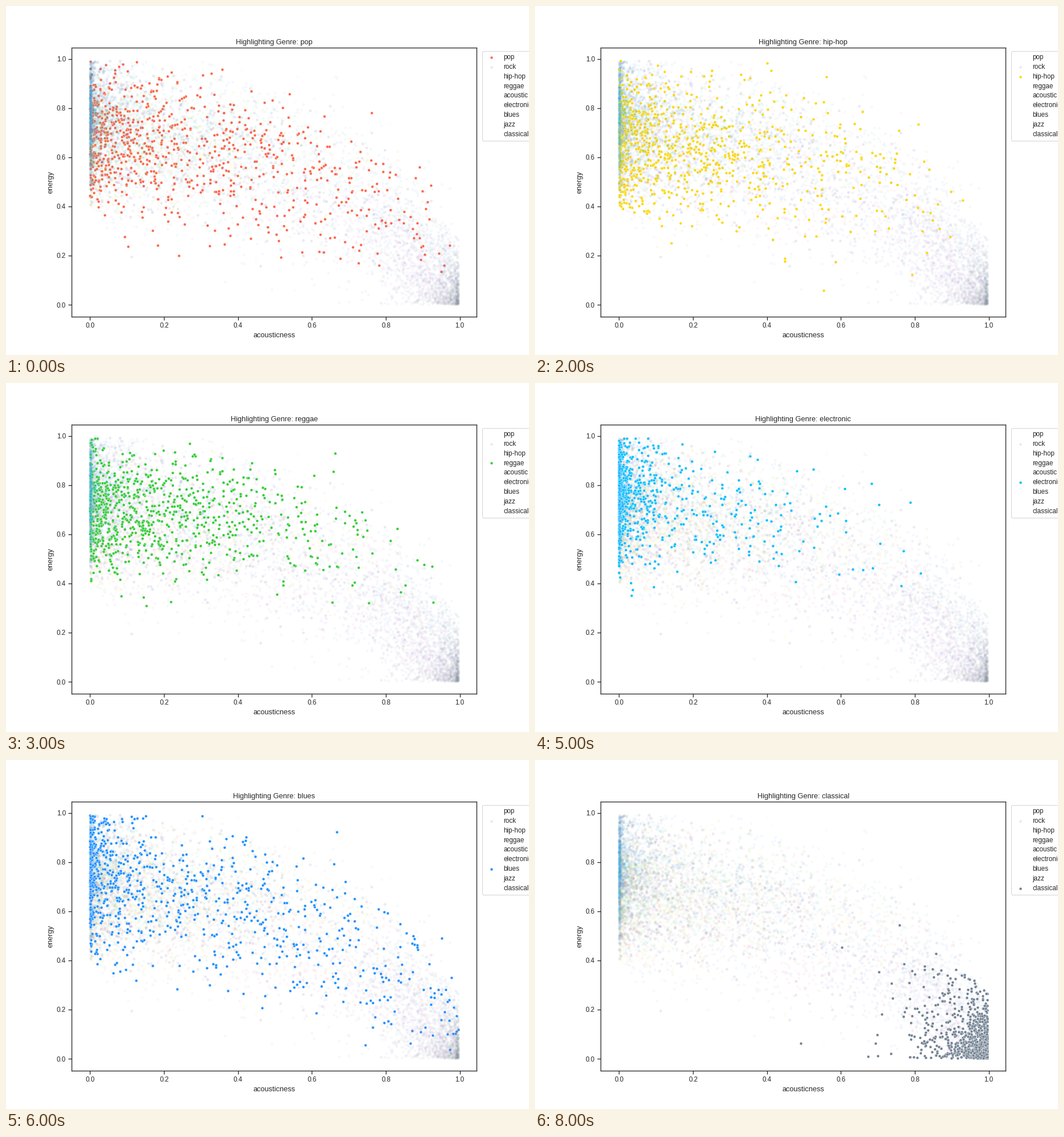
A matplotlib script that plays this animation: 917x611 px, repeating every 9 s.

```python
import numpy as np
import matplotlib.pyplot as plt
from matplotlib.animation import FuncAnimation

W, H, DPI = 917, 611, 76.4
INK = "#262626"
plt.rcParams.update({
    "font.family": "Liberation Sans", "font.size": 12,
    "text.color": INK, "axes.labelcolor": INK, "axes.edgecolor": INK,
    "xtick.color": INK, "ytick.color": INK,
    "axes.titlesize": 12, "axes.labelsize": 12, "legend.fontsize": 11,
    "xtick.labelsize": 11, "ytick.labelsize": 11, "axes.linewidth": 1.25,
    "xtick.major.size": 6, "ytick.major.size": 6,
    "xtick.major.width": 1.25, "ytick.major.width": 1.25,
})
rng = np.random.default_rng(12)
COUNT, DRAWS = 900, 2500


def skewed(a, b):
    return rng.beta(a, b, DRAWS)


def two_ended(share):
    """Mostly acoustic tracks, with the rest spread over the whole range."""
    return np.where(rng.random(DRAWS) < share, skewed(9, 1.4), skewed(0.6, 1.2))


def falling(x, top, slope, sd=0.15):
    """Energy drops with acousticness, faster and tighter near 1."""
    y = rng.normal(top - slope * x - 0.25 * x**4, sd * (1 - 0.4 * x**4))
    ok = (y > 0.002) & (y < 0.993) & (y > 0.4 - 2 * x)
    return x[ok][:COUNT] * 0.996, y[ok][:COUNT]


def quiet():
    """Nearly all fully acoustic, with energy hugging zero."""
    x = 0.996 * (1 - skewed(0.6, 11))
    y = 0.002 + rng.exponential(0.065 + 0.6 * (1 - x))
    ok = y < 0.28 + 1.2 * (1 - x)
    return x[ok][:COUNT], y[ok][:COUNT]


# name, colour, points
GENRES = [
    ("pop", "tomato", falling(skewed(0.5, 1.5), 0.69, 0.22)),
    ("rock", "darkslateblue", falling(skewed(0.35, 1.8), 0.76, 0.35)),
    ("hip-hop", "gold", falling(skewed(0.5, 2.2), 0.65, 0.12)),
    ("reggae", "limegreen", falling(skewed(0.6, 2.4), 0.71, 0.10, 0.13)),
    ("acoustic", "steelblue", falling(two_ended(0.5), 0.73, 0.36)),
    ("electronic", "deepskyblue", falling(skewed(0.2, 2.5), 0.77, 0.25, 0.13)),
    ("blues", "dodgerblue", falling(skewed(0.35, 1.1), 0.77, 0.37, 0.17)),
    ("jazz", "mediumorchid", falling(two_ended(0.6), 0.62, 0.35, 0.13)),
    ("classical", "slategray", quiet()),
]


def fade(name):
    return 0.1 if name == "rock" else 0.05


fig = plt.figure(figsize=((W + 0.01) / DPI, (H + 0.01) / DPI), dpi=DPI,
                 facecolor="white")
left, right, top, bottom = 115.2, 825.4, 73.3, 544.3
ax = fig.add_axes([left / W, 1 - bottom / H, (right - left) / W, (bottom - top) / H])
ax.set(xlim=(-0.0498, 1.0458), ylim=(-0.0495, 1.0455),
       xlabel="acousticness", ylabel="energy")

dots = [ax.scatter(*points, s=21, color=color, edgecolors="white",
                   linewidths=0.4, label=name)
        for name, color, points in GENRES]
legend = ax.legend(loc="upper left", bbox_to_anchor=(1.005, 1), labelspacing=0.42)
keys = legend.legend_handles


def draw(i):
    for k, (name, _, _) in enumerate(GENRES):
        dots[k].set_alpha(1 if k == i else fade(name))
        keys[k].set_alpha(1 if k == i else 0.1 if name == "rock" else 0)
    ax.set_title(f"Highlighting Genre: {GENRES[i][0]}")
    return dots


anim = FuncAnimation(fig, draw, frames=len(GENRES), interval=1000,
                     repeat=True, repeat_delay=0, blit=False)
plt.show()
```
